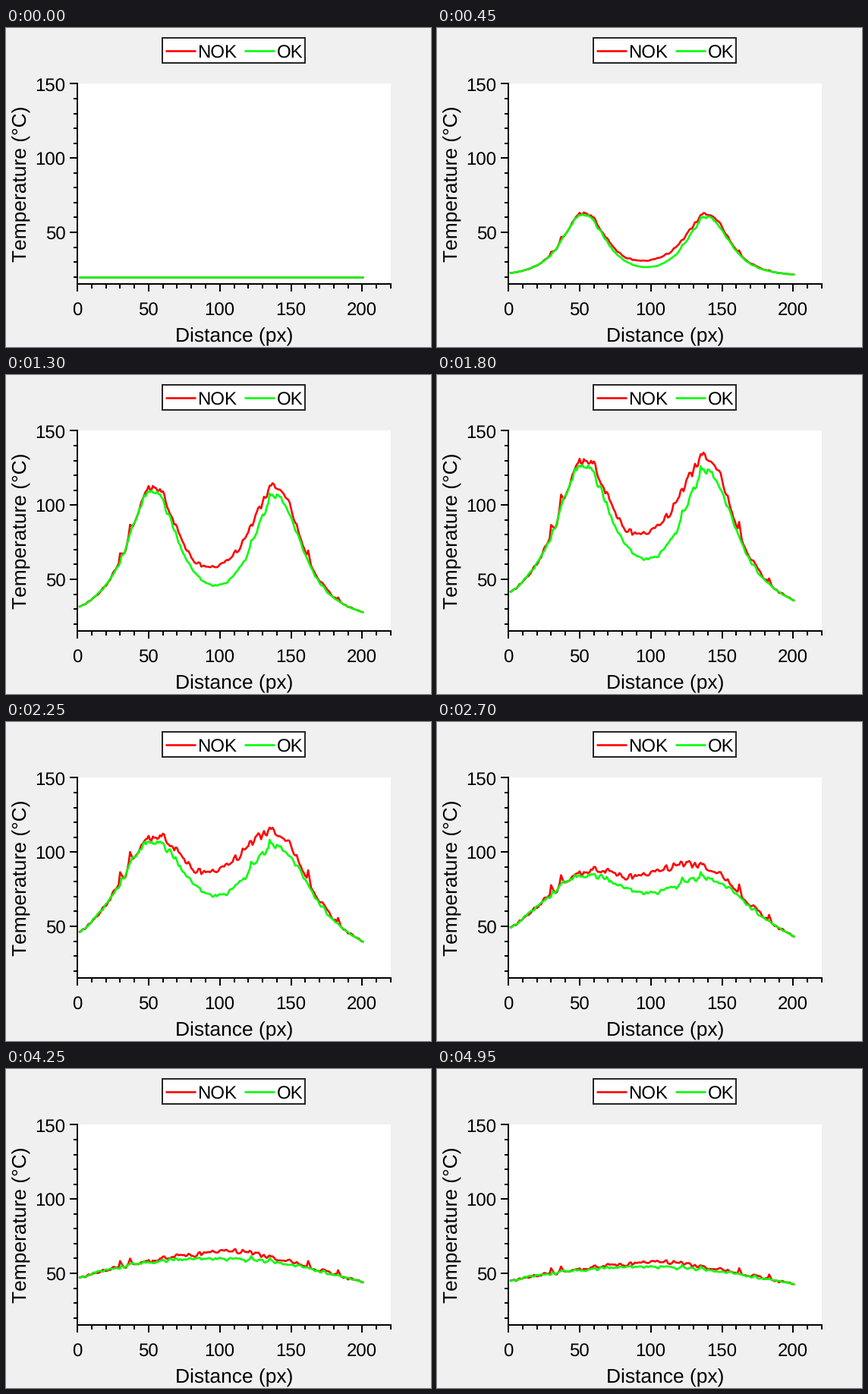
A matplotlib script that plays this animation: 560x420 px, repeating every 5000 ms.

```python
import numpy as np
import matplotlib.pyplot as plt
from matplotlib.animation import FuncAnimation
from matplotlib.patches import Rectangle

W, H, DPI = 560, 420, 100
FRAMES, STEP = 100, 50
PX = 72 / DPI  # points per pixel
LEFT, RIGHT, TOP, BOTTOM = 94, 507, 73.4, 337.4
RED, GREEN = "#ff0000", "#00ff00"

AMBIENT = 20
HEAT_END = 2.0  # seconds
PEAKS = ((53, 1.0), (140, 0.94))  # heater position, relative strength
BLEND = 1.3  # exponent that merges the two humps

plt.rcParams["font.family"] = "Liberation Sans"
plt.rcParams["text.hinting"] = "none"
plt.rcParams["text.kerning_factor"] = 6  # plain advances, no kerning

dist = np.arange(1, 202)


def to_x(d):
    return LEFT + d * (RIGHT - LEFT) / 220


def to_y(temp):
    return BOTTOM - (temp - 15) * (BOTTOM - TOP) / 135


def heat(t):
    """Excess temperature along the line after t seconds."""
    on, off = min(t, HEAT_END), max(t - HEAT_END, 0)
    height = 136.5 * (1 - np.exp(-on / 1.2)) / (1 + off / 0.8)
    width = 25 + 31 * off
    falloff = max(1, 1.95 - 0.53 * on)
    humps = [k * (1 + ((dist - c) / width) ** 2) ** -falloff for c, k in PEAKS]
    return height * sum(h ** BLEND for h in humps) ** (1 / BLEND)


def defect(t):
    """Extra heat held between the peaks by the faulty part."""
    on, off = min(t, HEAT_END), max(t - HEAT_END, 0)
    return 11 * on * np.exp(-0.62 * off - ((dist - 110) / 27) ** 2 / 2)


def sensor_gain(noise, spikes, spike, seed):
    """Fixed per-pixel gain: short-range jitter and a few hot pixels."""
    raw = np.random.RandomState(seed).normal(0, noise, len(dist) + 1)
    gain = 1 + np.clip((raw[1:] + raw[:-1]) / 2 ** 0.5, -2 * noise, 2 * noise)
    for d in spikes:
        gain[d - 1:d + 1] = 1 + spike, 1 + spike / 2
    return gain


fig = plt.figure(figsize=(W / DPI, H / DPI), dpi=DPI, facecolor="#f0f0f0")
ax = fig.add_axes([0, 0, 1, 1])
ax.set_xlim(0, W)
ax.set_ylim(H, 0)
ax.axis("off")


def stroke(xs, ys, color="black", width=2, z=4):
    return ax.plot(xs, ys, color=color, lw=width * PX, zorder=z,
                   solid_capstyle="butt", solid_joinstyle="round")[0]


def label(x, y, text, size=24, ha="center", rotation=0):
    ax.text(x, y, text, fontsize=size * PX, ha=ha, va="baseline",
            rotation=rotation, rotation_mode="anchor", color="black")


# Plot area and axes
ax.add_patch(Rectangle((LEFT, TOP), RIGHT - LEFT, BOTTOM - TOP,
                       fc="white", ec="none", zorder=1))
stroke([LEFT, LEFT], [TOP - 1, BOTTOM + 1])
stroke([LEFT - 1, RIGHT + 1], [BOTTOM, BOTTOM])
for d in range(0, 221, 10):
    major = d % 50 == 0
    stroke([to_x(d)] * 2, [BOTTOM, BOTTOM + (10 if major else 5.5)])
    if major:
        label(to_x(d) - 0.5, 379, str(d))
for temp in range(20, 151, 10):
    major = temp % 50 == 0
    stroke([LEFT - (10 if major else 5.5), LEFT], [to_y(temp)] * 2)
    if major:
        label(78.5, to_y(temp) + 10, str(temp), ha="right")
label(300.5, 414, "Distance (px)", 26.4)
label(28, 205.5, "Temperature (°C)", 26.4, rotation=90)

# Legend
ax.add_patch(Rectangle((206, 13), 188, 33, fc="white", ec="#262626",
                       lw=2 * PX, zorder=2))
for x, color, name in ((210, RED, "NOK"), (314, GREEN, "OK")):
    stroke([x, x + 39.5], [30, 30], color, 2.6)
    label(x + 42.5, 40, name, ha="left")

nok_gain = sensor_gain(0.02, (30, 37, 162, 183), 0.12, 4)
ok_gain = sensor_gain(0.016, (122, 135), 0.07, 9)
nok_line = stroke([], [], RED, 2.6, 2)
ok_line = stroke([], [], GREEN, 2.6, 3)


def draw(frame):
    t = frame * STEP / 1000
    base = heat(t)
    nok = AMBIENT + (base + defect(t)) * nok_gain
    ok = AMBIENT + base * ok_gain
    nok_line.set_data(to_x(dist), to_y(nok))
    ok_line.set_data(to_x(dist), to_y(ok))
    return nok_line, ok_line


anim = FuncAnimation(fig, draw, frames=FRAMES, interval=STEP,
                     repeat=True, repeat_delay=0)
plt.show()
```
